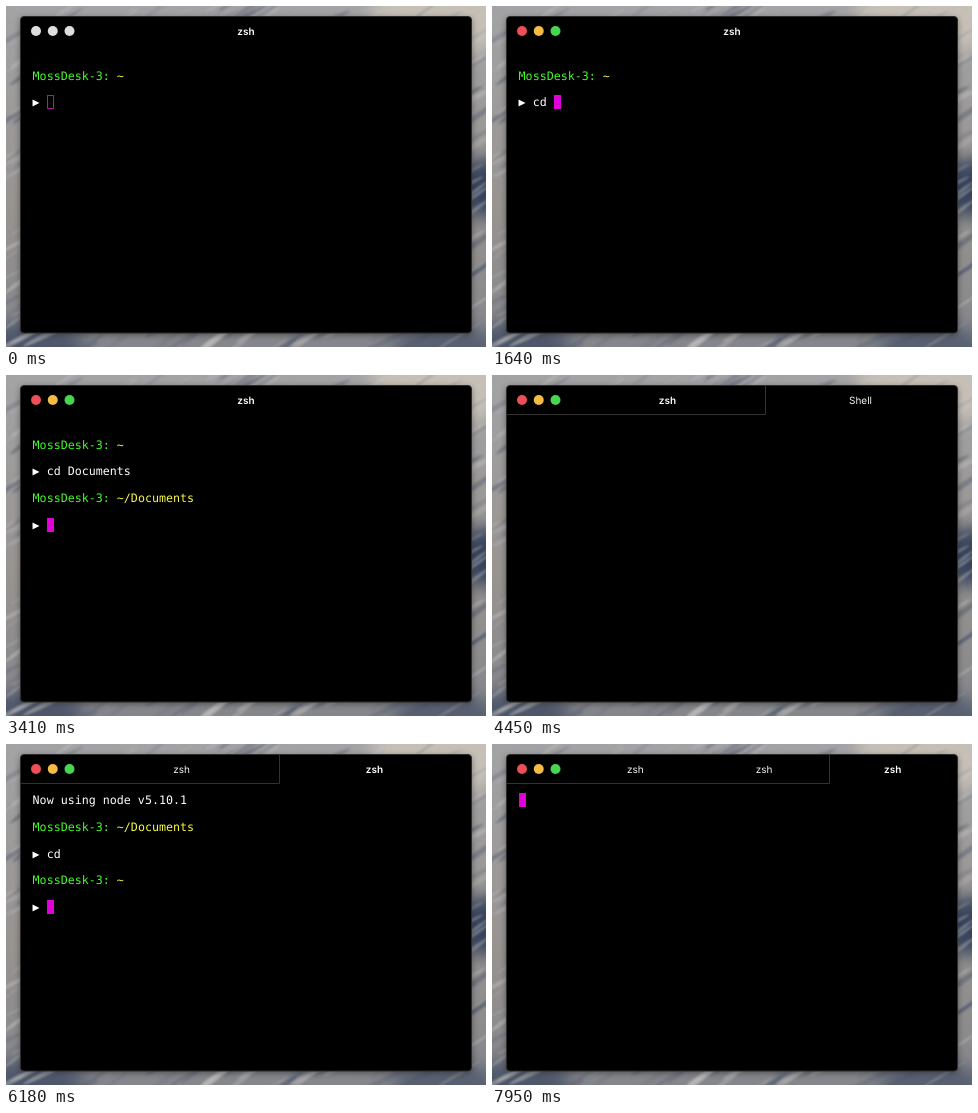
Recreate the animation shown at these times as an HTML page. Size 480x341 px, loop 8 s.

```html
<!DOCTYPE html>
<html lang="en">
<head>
<meta charset="utf-8">
<title>Terminal tabs</title>
<style>
  html, body { margin: 0; width: 100%; height: 100%; overflow: hidden; background: #85868a; }
  svg { display: block; width: 480px; height: 341px; }
  text { white-space: pre; text-rendering: geometricPrecision; }
  .row { font: 11.66px "DejaVu Sans Mono", monospace; fill: #fff; }
  .host { fill: #44fa2e; }
  .path { fill: #f7fa45; }
  .title { font: 10px Inter, sans-serif; fill: #f2f2f2; text-anchor: middle; }
  .active { font-weight: 600; fill: #fff; }
  .rule { fill: none; stroke: #333; }
</style>
</head>
<body>
<svg viewBox="0 0 480 341">
  <defs>
    <linearGradient id="snow" x2="0" y2="1">
      <stop offset="0" stop-color="#a3a3a5"/>
      <stop offset=".6" stop-color="#97938f"/>
      <stop offset="1" stop-color="#85868b"/>
    </linearGradient>
    <filter id="wide" x="-50%" y="-50%" width="200%" height="200%"><feGaussianBlur stdDeviation="9"/></filter>
    <filter id="soft"><feGaussianBlur stdDeviation=".9"/></filter>
    <filter id="shade" x="-10%" y="-10%" width="120%" height="120%"><feGaussianBlur stdDeviation="3"/></filter>
  </defs>
  <rect width="480" height="341" fill="url(#snow)"/>
  <g filter="url(#wide)">
    <ellipse cx="440" cy="5" rx="75" ry="45" fill="#c6bfb6"/>
    <ellipse cx="478" cy="182" rx="25" ry="30" fill="#35435c"/>
    <ellipse cx="20" cy="341" rx="60" ry="25" fill="#4d566a"/>
    <ellipse cx="440" cy="341" rx="55" ry="22" fill="#565f70"/>
  </g>
  <g id="streaks" filter="url(#soft)"></g>
  <rect x="14" y="12" width="452" height="317" rx="4" opacity=".4" filter="url(#shade)"/>
  <rect x="14.5" y="10.5" width="451" height="316.5" rx="3.5" stroke="#2d2d2d"/>
  <g id="lights"></g>
  <g id="tabs"></g>
  <g id="screen"></g>
</svg>
<script>
const LOOP = 8000, FOCUS = 250;
const CELL = { x: 26.6, y: 49.4, w: 7.02, h: 13.35 };
const HOST = 'MossDesk-3:';
const TAB_TWO = { open: 4370, ready: 4600, greet: 5080 };
const TAB_THREE = { open: 7520, ready: 7720 };
const $ = id => document.getElementById(id);
const repeat = (count, make) => Array.from({ length: count }, (_, i) => make(i)).join('');

let seed = 11;
const random = () => (seed = seed * 16807 % 2147483647) / 2147483647;

// Thin wind-blown ridges, all leaning the same way
function streak() {
  const x = random() * 480, y = random() * 341;
  const tone = random() < .5 ? '#c4c3c2' : '#4f596d';
  return `<ellipse cx="${x}" cy="${y}" rx="${10 + random() * 30}" ry="${.6 + random() * 2.4}"
    fill="${tone}" opacity="${.15 + random() * .4}" transform="rotate(${-38 + random() * 12} ${x} ${y})"/>`;
}
$('streaks').innerHTML = repeat(420, streak);

const line = (row, body) =>
  `<text class="row" x="${CELL.x}" y="${60.2 + row * CELL.h}">${body}</text>`;
const prompt = (row, path) =>
  line(row, `<tspan class="host">${HOST}</tspan> <tspan class="path">${path}</tspan>`);
const command = (row, text) => line(row, '▶ ' + text);

function cursor(row, col, hollow) {
  const x = Math.round(CELL.x + col * CELL.w), y = Math.round(CELL.y + row * CELL.h);
  return hollow
    ? `<rect x="${x + .5}" y="${y + .5}" width="6" height="13" fill="none" stroke="#a31ca0"/>`
    : `<rect x="${x}" y="${y}" width="7" height="14" fill="#e000d8"/>`;
}

// Lit for a second, dark for half a second
const lit = since => (since + 1500) % 1500 < 1000;

const typed = (t, words) => words.map(({ text, start, step }) =>
  text.slice(0, Math.max(0, Math.floor((t - start) / step) + 1))).join('');

// One directory change: the command being typed, then the next prompt
function session(t, row, { from, to, words, enter, reply, phase }) {
  const entry = typed(t, words);
  const focused = t >= FOCUS;
  let out = prompt(row, from) + command(row + 2, entry);
  let at = [row + 2, 2 + entry.length];
  if (t >= enter) at = [row + 3, 0];
  if (t >= reply) {
    out += prompt(row + 4, to) + command(row + 6, '');
    at = [row + 6, 2];
  }
  return out + (!focused || lit(t - phase) ? cursor(...at, !focused) : '');
}

const first = {
  from: '~', to: '~/Documents',
  words: [{ text: 'cd ', start: 1130, step: 170 }, { text: 'Documents', start: 1750, step: 80 }],
  enter: 2740, reply: 2830, phase: 960
};
const second = {
  from: '~/Documents', to: '~',
  words: [{ text: 'cd', start: 5640, step: 140 }],
  enter: 5960, reply: 6050, phase: TAB_TWO.ready
};

function screen(t) {
  if (t < TAB_TWO.open) return session(t, 1, first);
  if (t < TAB_TWO.ready) return '';
  if (t < TAB_TWO.greet) return cursor(0, 0);
  if (t < TAB_THREE.open) return line(0, 'Now using node v5.10.1') + session(t, 2, second);
  return t < TAB_THREE.ready ? '' : cursor(0, 0);
}

function tabs(t) {
  const label = (x, text, active) =>
    `<text class="title ${active ? 'active' : ''}" x="${x}" y="28.6">${text}</text>`;
  if (t < TAB_TWO.open) return label(240, 'zsh', true);
  const count = t < TAB_THREE.open ? 2 : 3;
  const ready = t >= (count === 2 ? TAB_TWO : TAB_THREE).ready;
  const last = count - 1, width = 386 / count;
  const edge = Math.floor(465 - width) + 1.5;
  return `<path class="rule" d="M15 39.5H${edge}V11"/>` + repeat(count, i =>
    label(79 + width * (i + .5), i === last && !ready ? 'Shell' : 'zsh', i === (ready ? last : last - 1)));
}

function lights(t) {
  const colors = t < FOCUS ? Array(3).fill('#dedede') : ['#ed4e58', '#f4bb45', '#47d651'];
  return repeat(3, i => `<circle cx="${30 + i * 16.75}" cy="25" r="5" fill="${colors[i]}"/>`);
}

const shown = {};
function update(id, markup) {
  if (shown[id] !== markup) $(id).innerHTML = shown[id] = markup;
}

const start = performance.now();
function draw() {
  const t = (performance.now() - start) % LOOP;
  update('lights', lights(t));
  update('tabs', tabs(t));
  update('screen', screen(t));
  requestAnimationFrame(draw);
}
draw();
</script>
</body>
</html>
```
